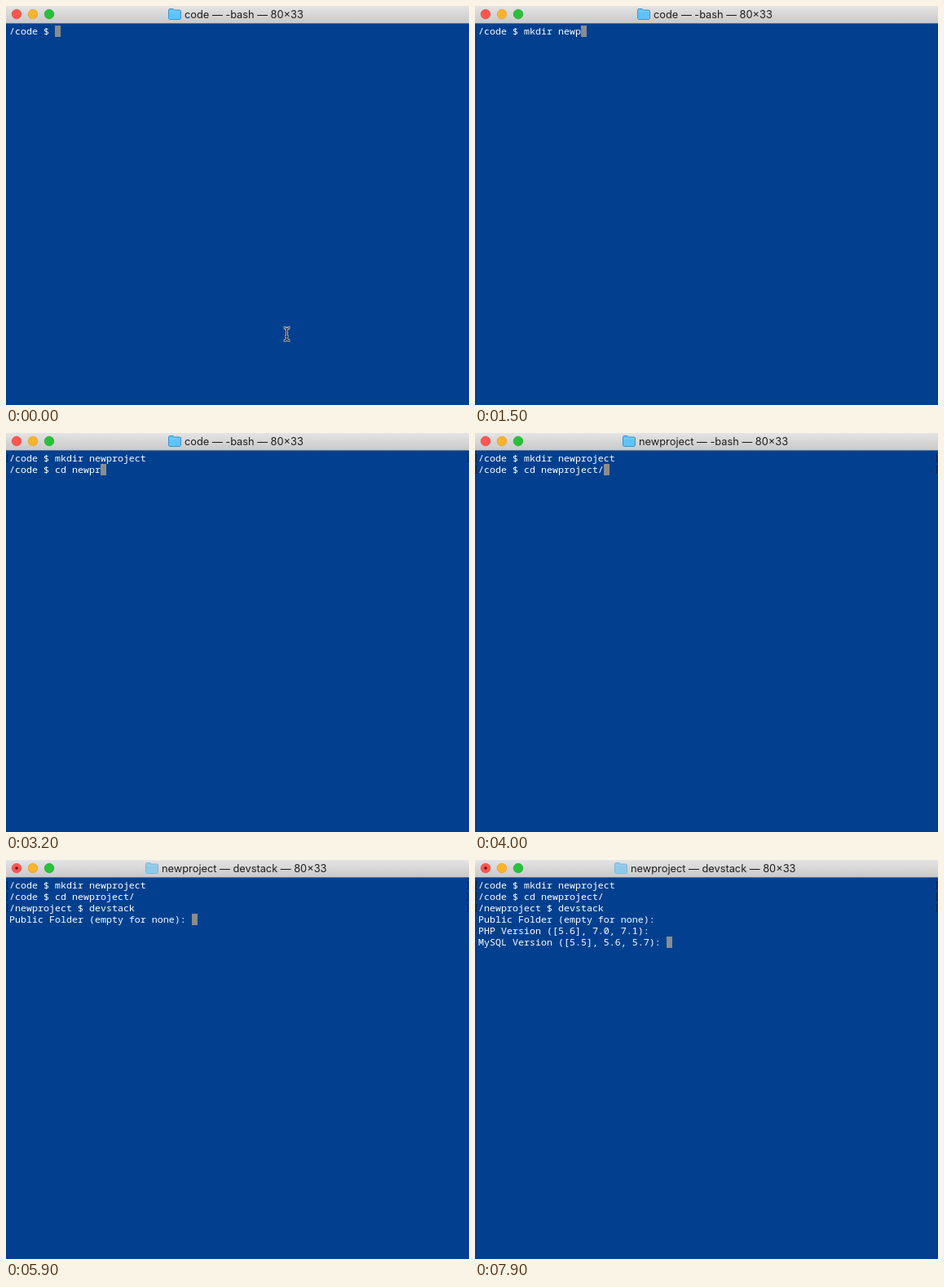
Animation, 568 px wide and 490 px high, one loop 8 s. Source, as an HTML page with a canvas:

```html
<!DOCTYPE html>
<html lang="en">
<head>
<meta charset="utf-8">
<title>Terminal</title>
<style>
  html, body { margin: 0; width: 100%; height: 100%; overflow: hidden; background: #02408f; }
  canvas { display: block; }
</style>
</head>
<body>
<canvas id="stage" width="568" height="490"></canvas>
<script>
const ctx = document.getElementById('stage').getContext('2d');
const LOOP = 8000, KEY = 100, CELL = 7, LINE = 14, LEFT = 4, TOP = 24;

// Each row appears at `at`; `keys` are runs of typing with their start times.
const rows = [
  { at: 0, prompt: '/code $ ', keys: [['mkdir ', 200], ['new', 1100], ['project', 1500]], enter: 2200 },
  { at: 2200, prompt: '/code $ ', keys: [['c', 2300], ['d newproject/', 2600]], enter: 4000 },
  { at: 4100, prompt: '/newproject $ ', keys: [['devstack', 4600]], enter: 5500 },
  { at: 5600, prompt: 'Public Folder (empty for none): ', keys: [] },
  { at: 6500, prompt: 'PHP Version ([5.6], 7.0, 7.1): ', keys: [] },
  { at: 7600, prompt: 'MySQL Version ([5.5], 5.6, 5.7): ', keys: [] }
];

const titles = [
  { at: 0, text: 'code — -bash — 80×33', x: 219 },
  { at: 4000, text: 'newproject — -bash — 80×33', x: 201 },
  { at: 5500, text: 'newproject — devstack — 80×33', x: 191, busy: true }
];

function rect(x, y, w, h, color) {
  ctx.fillStyle = color;
  ctx.fillRect(x, y, w, h);
}

function disc(x, y, r, fill, edge) {
  ctx.beginPath();
  ctx.arc(x, y, r, 0, 2 * Math.PI);
  ctx.fillStyle = fill;
  ctx.fill();
  if (!edge) return;
  ctx.lineWidth = 0.7;
  ctx.strokeStyle = edge;
  ctx.stroke();
}

function text(string, x, y, font, color) {
  ctx.font = font;
  ctx.fillStyle = color;
  ctx.fillText(string, x, y);
}

function folder(x, busy) {
  ctx.fillStyle = busy ? '#8fc9e9' : '#5fc2fa';
  ctx.strokeStyle = busy ? '#86b5d0' : '#3f93c6';
  ctx.lineWidth = 1;
  ctx.beginPath();
  ctx.moveTo(x + 0.5, 15.5);
  ctx.lineTo(x + 0.5, 4.5);
  ctx.lineTo(x + 1.5, 3.5);
  ctx.lineTo(x + 6, 3.5);
  ctx.lineTo(x + 7.5, 5);
  ctx.lineTo(x + 14.5, 5);
  ctx.lineTo(x + 15.5, 6);
  ctx.lineTo(x + 15.5, 15.5);
  ctx.lineTo(x + 14.5, 16.5);
  ctx.lineTo(x + 1.5, 16.5);
  ctx.closePath();
  ctx.fill();
  ctx.stroke();
  rect(x + 1, 6.5, 14, 0.8, busy ? '#a6d6ef' : '#8ad5fd');
}

function titleBar(t) {
  const title = titles.findLast(item => t >= item.at);
  const shade = ctx.createLinearGradient(0, 0, 0, 21);
  shade.addColorStop(0, '#e4e4e4');
  shade.addColorStop(1, '#c9c9c9');
  rect(0, 0, 568, 21, shade);
  rect(0, 21, 568, 1, '#4a6a98');
  disc(13, 10, 5.8, '#fc5650', '#df4a45');
  disc(33, 10, 5.8, '#fdb32b', '#dea02c');
  disc(53, 10, 5.8, '#27c13a', '#24a834');
  if (title.busy) disc(13, 10, 1.8, '#6b0f0c');
  folder(title.x - 20, title.busy);
  text(title.text, title.x, 15, '12.8px Inter, sans-serif', '#1c1c1c');
}

function bracket(x, y, dir) {
  rect(x, y + 2, 1, 10, '#0a2347');
  rect(dir > 0 ? x : x - 1, y + 2, 2, 1, '#0a2347');
  rect(dir > 0 ? x : x - 1, y + 11, 2, 1, '#0a2347');
}

function typed(keys, t) {
  return keys.map(([run, start]) =>
    run.slice(0, Math.max(0, Math.floor((t - start) / KEY) + 1))).join('');
}

function terminal(t) {
  const shown = rows.filter(row => t >= row.at);
  shown.forEach((row, i) => {
    const y = TOP + i * LINE;
    const line = row.prompt + typed(row.keys, t);
    if (t >= row.enter) {
      bracket(1, y, 1);
      bracket(566, y, -1);
    }
    if (i === shown.length - 1) rect(LEFT + line.length * CELL, y, CELL, LINE, '#8c8c8c');
    text(line, LEFT, y + 11, '500 11.667px "Noto Sans Mono", monospace', '#fff');
  });
}

function pointer(x, y) {
  ctx.beginPath();
  for (const side of [-1, 1]) {
    ctx.moveTo(x + side * 4, y - 8);
    ctx.quadraticCurveTo(x, y - 8, x, y - 5);
    ctx.lineTo(x, y + 5);
    ctx.quadraticCurveTo(x, y + 8, x + side * 4, y + 8);
  }
  ctx.moveTo(x - 2, y + 3);
  ctx.lineTo(x + 2, y + 3);
  for (const [width, color] of [[2.8, '#d5dbe4'], [1.2, '#111']]) {
    ctx.lineWidth = width;
    ctx.strokeStyle = color;
    ctx.stroke();
  }
}

function draw() {
  const t = performance.now() % LOOP;
  rect(0, 0, 568, 490, '#02408f');
  titleBar(t);
  terminal(t);
  if (t < 100) pointer(344.5, 403);
  requestAnimationFrame(draw);
}
draw();
</script>
</body>
</html>
```
